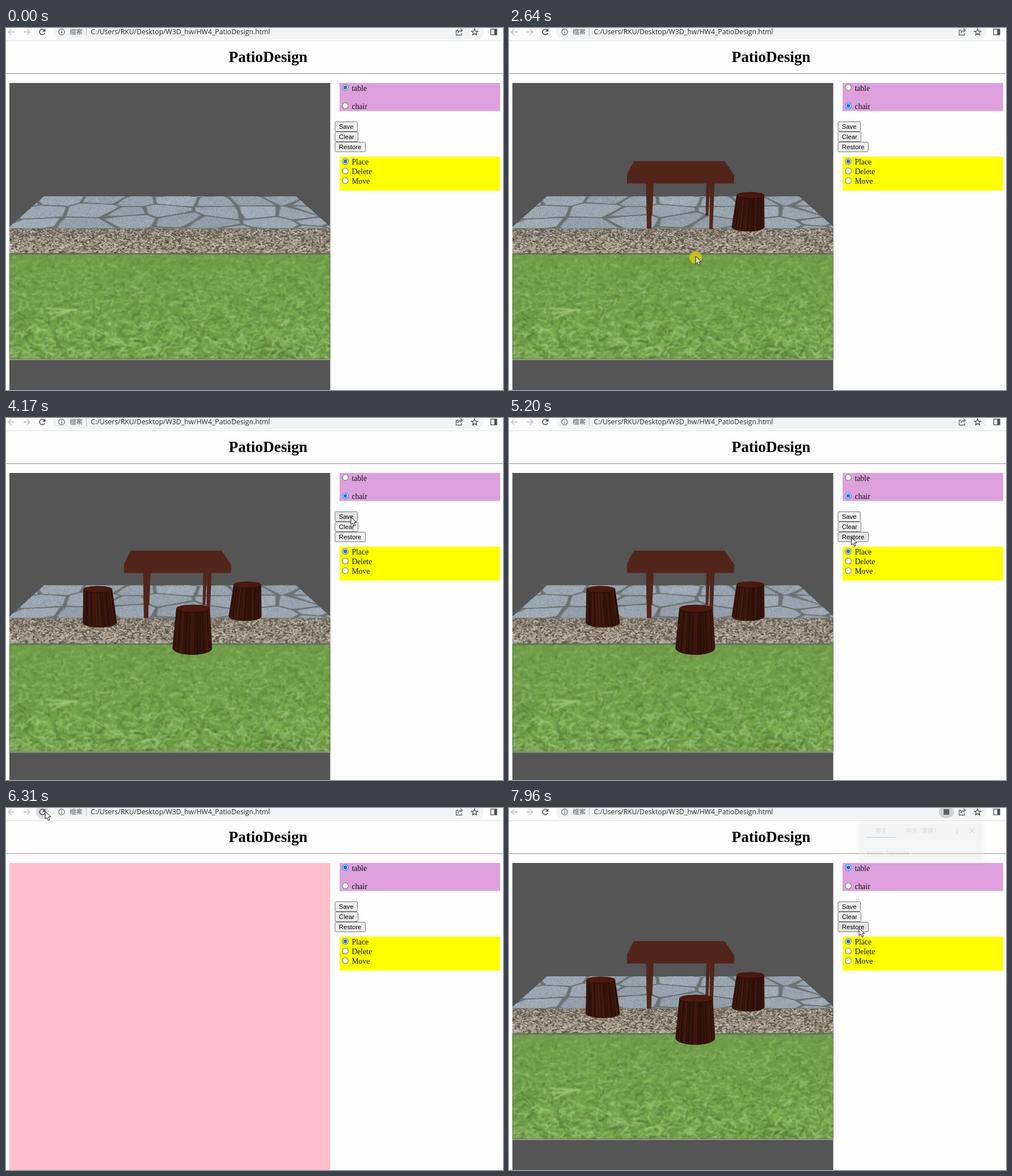
Write an HTML page with a canvas that moves like this. It is 876 by 639 pixels and loops after 8 s.

```html
<!DOCTYPE html>
<html>
<head>
<meta charset="utf-8">
<title>PatioDesign</title>
<style>
html, body { margin: 0; width: 100%; height: 100%; overflow: hidden; background: #fefefe; }
canvas { display: block; }
</style>
</head>
<body>
<canvas id="stage" width="876" height="639"></canvas>
<script>
const W = 876, H = 639, LOOP = 8000;
const ctx = document.getElementById('stage').getContext('2d');
const SERIF = '"Liberation Serif", serif';
const SANS = '"Liberation Sans", sans-serif';
const CJK = '"Noto Sans CJK TC", "Noto Sans CJK JP", "Noto Sans CJK SC", sans-serif';
const GREY = '#5f6368', DARK = '#4a4d51', WOOD = '#52251b';
const VIEW = { x: 6, y: 97, w: 565.5, h: 542 };
const FLOOR = 297, GRAVEL = 354, GRASS = 399, EDGE = 585;

function seeded(seed) {
  return () => {
    seed = (seed + 0x6D2B79F5) | 0;
    let n = Math.imul(seed ^ (seed >>> 15), 1 | seed);
    n = (n + Math.imul(n ^ (n >>> 7), 61 | n)) ^ n;
    return ((n ^ (n >>> 14)) >>> 0) / 4294967296;
  };
}

const mix = (a, b, k) => a + (b - a) * k;
const clamp = k => Math.min(1, Math.max(0, k));
const smooth = k => k * k * (3 - 2 * k);
const within = (t, a, b) => t >= a && t < b;

function layer(draw) {
  const c = document.createElement('canvas');
  c.width = W;
  c.height = H;
  draw(c.getContext('2d'));
  return c;
}

function rect(g, x, y, w, h, fill) {
  g.fillStyle = fill;
  g.fillRect(x, y, w, h);
}

function trace(g, pts) {
  g.beginPath();
  for (let i = 0; i < pts.length; i += 2) g.lineTo(pts[i], pts[i + 1]);
}

function poly(g, pts, fill) {
  trace(g, pts);
  g.fillStyle = fill;
  g.fill();
}

function line(g, pts, color, width = 1.3) {
  trace(g, pts);
  g.strokeStyle = color;
  g.lineWidth = width;
  g.stroke();
}

function oval(g, x, y, rx, ry, fill, turn = 0) {
  g.beginPath();
  g.ellipse(x, y, rx, ry, turn, 0, 7);
  g.fillStyle = fill;
  g.fill();
}

function text(g, str, x, y, font, fill = '#000', align = 'left') {
  g.font = font;
  g.fillStyle = fill;
  g.textAlign = align;
  g.fillText(str, x, y);
}

// ---- ground textures ----
// Flagstones are Voronoi cells on a jittered grid, seen in perspective.
const stones = layer(g => {
  const rnd = seeded(11), cols = 7, rows = 3, sites = [];
  for (let c = -1; c <= cols; c++) {
    for (let r = -1; r <= rows; r++) {
      sites.push({ u: c + .1 + rnd() * .8, v: r + .1 + rnd() * .8, tint: rnd() * 16 - 8 });
    }
  }
  const image = g.createImageData(W, GRAVEL - FLOOR);
  for (let y = 0; y < image.height; y++) {
    const depth = y / image.height, half = mix(222.5, 287, depth);
    for (let x = Math.max(VIEW.x, Math.ceil(288.5 - half)); x < Math.min(571, 288.5 + half); x++) {
      const u = ((x - 288.5) / half + 1) / 2 * cols, v = depth ** .85 * rows;
      let near = 9, next = 9, tint = 0;
      for (const s of sites) {
        const d = Math.hypot(s.u - u, s.v - v);
        if (d < near) { next = near; near = d; tint = s.tint; }
        else if (d < next) next = d;
      }
      const joint = 1 - clamp((next - near - .05) / .07);
      const grain = tint + (rnd() - .5) * 30;
      const i = (y * W + x) * 4;
      image.data[i] = mix(153 + grain, 106, joint);
      image.data[i + 1] = mix(165 + grain, 113, joint);
      image.data[i + 2] = mix(177 + grain, 114, joint);
      image.data[i + 3] = 255;
    }
  }
  g.putImageData(image, 0, FLOOR);
});

const gravel = layer(g => {
  const rnd = seeded(23);
  g.rect(VIEW.x, GRAVEL, VIEW.w, GRASS - GRAVEL);
  g.clip();
  rect(g, VIEW.x, GRAVEL, VIEW.w, 45, '#6d6357');
  for (let i = 0; i < 4600; i++) {
    const depth = rnd(), s = .6 + depth * .4, pebble = rnd() > .16;
    oval(g, VIEW.x + rnd() * VIEW.w, mix(GRAVEL, GRASS, depth), (1.5 + rnd() * 2.3) * s, (.8 + rnd()) * s,
      `hsl(${30 + rnd() * 10},${7 + rnd() * 10}%,${pebble ? 49 + rnd() * 27 : 27 + rnd() * 10}%)`, rnd() - .5);
  }
});

const grass = layer(g => {
  const rnd = seeded(37);
  g.rect(VIEW.x, GRASS, VIEW.w, EDGE - GRASS);
  g.clip();
  rect(g, VIEW.x, GRASS, VIEW.w, EDGE - GRASS, '#6f9c48');
  g.lineCap = 'round';
  for (let i = 0; i < 6800; i++) {
    const depth = rnd() ** 1.35, s = .6 + depth * 1.3;
    const x = VIEW.x + rnd() * VIEW.w, y = mix(GRASS, EDGE, depth);
    const turn = rnd() * Math.PI, len = (4 + rnd() * 11) * s, bend = (rnd() - .5) * 7;
    const dx = Math.cos(turn) * len, dy = Math.sin(turn) * len * .65;
    g.beginPath();
    g.moveTo(x, y);
    g.quadraticCurveTo(x + dx / 2 + bend, y + dy / 2 - bend, x + dx, y + dy);
    g.strokeStyle = `hsla(${87 + rnd() * 9},${36 + rnd() * 10}%,${29 + rnd() * 40}%,.68)`;
    g.lineWidth = s * (.7 + rnd() * .9);
    g.stroke();
  }
  for (let i = 0; i < 3; i++) line(g, [72 + i * 4, 495 + i * 9, 124 - i * 6, 498], 'rgba(165,203,118,.8)', 3);
});

const ground = layer(g => {
  g.filter = 'blur(.5px)';
  g.drawImage(stones, 0, 0);
  g.drawImage(gravel, 0, 0);
  g.filter = 'blur(.9px)';
  g.drawImage(grass, 0, 0);
  g.filter = 'none';
  rect(g, VIEW.x, 353, VIEW.w, 1.2, '#85807b');
  rect(g, VIEW.x, 397.6, VIEW.w, 1.6, '#62615a');
  rect(g, VIEW.x, 583.6, VIEW.w, 1, '#6e7a62');
  rect(g, VIEW.x, 584.6, VIEW.w, 1.4, '#a2a5a2');
});

// ---- furniture ----
function drawTable(g) {
  const leg = (x, lean, w, foot) =>
    poly(g, [x, 270, x + w, 270, x + w * .75 + lean, foot, x + lean, foot], WOOD);
  leg(249, -1, 6, 331);
  leg(348, -1.5, 6.5, 331);
  leg(241.5, 1.5, 10.5, 354);
  leg(354.5, -1.5, 8, 355);
  poly(g, [220, 235, 380, 235, 397, 260, 396.5, 274.5, 208, 274.5, 208, 258], WOOD);
}

// A log stool whose size and lean follow from where it stands.
function drawChair(g, x, y) {
  const rnd = seeded(x), near = y - 351;
  const rx = 29 + near * .11, ry = 8 + near * .07;
  const tx = x + (x - 288) * .03, ty = y - 56 - near * .255;
  const topRx = rx * .84, topRy = 5.5 + near * .02;
  const body = new Path2D();
  body.ellipse(tx, ty, topRx, topRy, 0, Math.PI, 0);
  body.ellipse(x, y, rx, ry, 0, 0, Math.PI);
  body.closePath();
  g.save();
  g.clip(body);
  rect(g, x - 50, ty - 20, 100, 130, '#42170d');
  for (let u = -.98; u < 1; u += .055) {
    const drop = Math.sqrt(1 - u * u);
    line(g, [tx + topRx * u, ty + topRy * drop, x + rx * u, y + ry * drop + 1],
      `hsl(${10 + rnd() * 6},64%,${10 + rnd() * 9 - Math.abs(u) * 3}%)`, 1.2 + rnd() * 1.4);
  }
  oval(g, tx, ty + 1, topRx, topRy, '#260c07');
  oval(g, tx, ty, topRx, topRy, '#4a190f');
  g.restore();
}

const table = layer(drawTable);
const rightChair = layer(g => drawChair(g, 421.5, 351));
const leftChair = layer(g => drawChair(g, 165.5, 362));
const frontChair = layer(g => drawChair(g, 328.5, 406));

// ---- browser chrome and static page ----
function arrow(g, x, dir) {
  line(g, [x - 5.5 * dir, 7, x + 5.5 * dir, 7], '#b9bbbe', 1.4);
  line(g, [x + .5 * dir, 2, x + 5.5 * dir, 7, x + .5 * dir, 12], '#b9bbbe', 1.4);
}

const page = layer(g => {
  rect(g, 0, 0, W, H, '#fefefe');
  g.beginPath();
  g.roundRect(83, -8, 759, 27, 13);
  g.fillStyle = '#f1f3f4';
  g.fill();
  rect(g, 0, 22, W, 1, '#dddfe1');
  arrow(g, 9.5, -1);
  arrow(g, 36.5, 1);

  oval(g, 98, 7, 5.8, 5.8, GREY);
  oval(g, 98, 7, 4.6, 4.6, '#f1f3f4');
  rect(g, 97.4, 6.3, 1.3, 3.8, GREY);
  rect(g, 97.4, 3.8, 1.3, 1.3, GREY);
  text(g, '檔案', 112, 11, '11.5px ' + CJK, GREY);
  rect(g, 141, 0, 1, 14, '#b5b8bc');
  text(g, 'C:/Users/RKU/Desktop/W3D_hw/HW4_PatioDesign.html', 149.5, 11, '12.2px "Open Sans", sans-serif', '#26282b');

  line(g, [797, 4, 793.5, 4, 793.5, 12.5, 803, 12.5, 803, 9], GREY);
  line(g, [796.5, 9, 798, 5.5, 804, 4], GREY);
  line(g, [801, 1, 804.5, 4, 801, 7], GREY);
  g.beginPath();
  for (let i = 0; i < 10; i++) {
    const a = i * Math.PI / 5 - Math.PI / 2, r = i % 2 ? 2.6 : 6;
    g.lineTo(826 + Math.cos(a) * r, 7.5 + Math.sin(a) * r);
  }
  g.closePath();
  g.strokeStyle = DARK;
  g.stroke();
  g.strokeRect(854.5, 2, 10.5, 10);
  rect(g, 860.5, 2, 4.5, 10, DARK);

  text(g, 'PatioDesign', 462, 60, 'bold 27.2px ' + SERIF, '#000', 'center');
  rect(g, 0, 80, W, 1, '#939393');
  rect(g, 588, 97, 283, 49.5, '#dda0dd');
  rect(g, 588, 227, 283, 60, '#ffff00');
  const label = (str, y) => text(g, str, 609.5, y, '13.6px ' + SERIF, '#111');
  label('table', 111);
  label('chair', 143);
  ['Place', 'Delete', 'Move'].forEach((str, i) => label(str, 241 + i * 17));
});

function radio(y, on, blue) {
  oval(ctx, 598, y, 5.7, 5.7, on ? blue : '#767676');
  oval(ctx, 598, y, 4.7, 4.7, '#fff');
  if (on) oval(ctx, 598, y, 3.4, 3.4, blue);
}

function button(label, y, w, pointer) {
  const hovered = within(pointer.x, 580, 580 + w) && within(pointer.y, y, y + 18);
  ctx.beginPath();
  ctx.roundRect(580, y + .5, w - .5, 17, 2);
  ctx.fillStyle = hovered ? '#e4e4e4' : '#efefef';
  ctx.fill();
  ctx.strokeStyle = '#767676';
  ctx.lineWidth = 1;
  ctx.stroke();
  text(ctx, label, 586.7, y + 13, '11.33px ' + SANS);
}

function reloadIcon(pointer) {
  if (Math.hypot(pointer.x - 64, pointer.y - 7) < 13) oval(ctx, 64, 7, 12, 12, '#dcdee1');
  ctx.beginPath();
  ctx.arc(64, 7, 4.8, .4, 5.5);
  ctx.strokeStyle = DARK;
  ctx.lineWidth = 1.6;
  ctx.stroke();
  poly(ctx, [69.5, 1, 69.5, 6.5, 64, 6.5], DARK);
}

function popup(alpha) {
  if (alpha <= 0) return;
  ctx.save();
  ctx.globalAlpha = alpha;
  ctx.shadowColor = 'rgba(0,0,0,.3)';
  ctx.shadowBlur = 6;
  ctx.shadowOffsetY = 1;
  rect(ctx, 616, 23, 220, 75, '#fff');
  ctx.shadowColor = 'transparent';
  rect(ctx, 616, 60, 220, 38, '#f8f9fa');
  text(ctx, '英文', 656, 44, '10px ' + CJK, '#1a73e8', 'center');
  rect(ctx, 630, 51, 52, 2, '#1a73e8');
  text(ctx, '中文 ( 繁體 )', 727, 44, '10px ' + CJK, GREY, 'center');
  for (let y = 36; y <= 44; y += 4) oval(ctx, 790, y, 1.2, 1.2, GREY);
  line(ctx, [812, 36, 820, 44], GREY);
  line(ctx, [820, 36, 812, 44], GREY);
  text(ctx, 'Velomi Translate', 630, 83, '10px Roboto, sans-serif', GREY);
  ctx.restore();
}

// ---- the user's session: each visit ends in a click ----
const ENTER = 70, LINGER = 160, PRESS = 100, RESPONSE = 80;
const visits = [];
function visit(x, y, arrive, click, { via, leave } = {}) {
  const from = visits[visits.length - 1] || { x: 845, y: 613, click: ENTER - LINGER };
  const bend = via || { x: (from.x + x) / 2, y: (from.y + y) / 2 };
  visits.push({ x, y, arrive, click, from, bend, leave: leave || from.click + LINGER });
  return click + RESPONSE;
}

const tableAt = visit(302, 341, 610, 750, { via: { x: 590, y: 10 } });
const chairMode = visit(597, 131, 1340, 1470, { via: { x: 760, y: 150 } });
const rightAt = visit(423, 349, 2180, 2220);
const frontAt = visit(329, 403, 2590, 2600);
const leftAt = visit(166, 361, 2980, 3020);
visit(608, 175, 3960, 4240, { via: { x: 700, y: 200 } });
const clearAt = visit(605, 193, 4480, 4510);
const restoreAt = visit(604, 211, 4800, 5030);
const reloadAt = visit(69, 6, 5760, 5840);
const restoreAgainAt = visit(617, 212, 7400, 7690, { leave: 6580 });
const LOADED = 6510;

function pointerAt(t) {
  const v = visits.findLast(step => t >= step.leave);
  if (!v) return { x: -99, y: -99 };
  const k = smooth(clamp((t - v.leave) / (v.arrive - v.leave)));
  const along = axis => mix(mix(v.from[axis], v.bend[axis], k), mix(v.bend[axis], v[axis], k), k);
  return { x: along('x'), y: along('y') };
}

function drawPointer(t, { x, y }) {
  if (visits.some(v => within(t, v.click, v.click + PRESS))) {
    oval(ctx, x, y + 2, 11, 11, 'rgba(208,200,20,.88)');
  }
  ctx.save();
  ctx.translate(x, y);
  ctx.lineJoin = 'round';
  trace(ctx, [0, 0, 0, 13.5, 3.2, 10.7, 5.4, 15.8, 7.8, 14.8, 5.6, 9.8, 9.7, 9.6]);
  ctx.closePath();
  ctx.fillStyle = '#fff';
  ctx.fill();
  ctx.strokeStyle = '#111';
  ctx.lineWidth = 1;
  ctx.stroke();
  ctx.restore();
}

function drawScene(t) {
  const loading = within(t, reloadAt, LOADED);
  rect(ctx, VIEW.x, VIEW.y, VIEW.w, VIEW.h, loading ? '#ffc0cb' : '#555555');
  if (loading) return;

  // After the front chair the ground is drawn slightly taller.
  const taller = within(t, frontAt, reloadAt);
  const stretch = taller ? 1.022 : 1, lift = taller ? -1 : 0;
  ctx.save();
  ctx.translate(0, 380 * (1 - stretch));
  ctx.scale(1, stretch);
  ctx.drawImage(ground, 0, 0);
  ctx.restore();

  const restored = within(t, restoreAt, reloadAt) || t >= restoreAgainAt;
  const place = (item, from, dy) => {
    if (restored || within(t, from, clearAt)) ctx.drawImage(item, 0, dy);
  };
  place(table, tableAt, lift);
  place(rightChair, rightAt, lift);
  place(leftChair, leftAt, lift);
  place(frontChair, frontAt, 0);
}

function render(t) {
  const pointer = pointerAt(t);
  const chairs = within(t, chairMode, reloadAt);
  ctx.drawImage(page, 0, 0);
  reloadIcon(pointer);
  drawScene(t);
  radio(105, !chairs, t < chairMode ? '#3f74ab' : '#0b6fd8');
  radio(137.5, chairs, '#1a7cec');
  for (let i = 0; i < 3; i++) radio(235.5 + i * 17, i === 0, '#41739f');
  button('Save', 165, 40, pointer);
  button('Clear', 183, 41, pointer);
  button('Restore', 201, 54, pointer);
  if (t >= LOADED + 210) {
    oval(ctx, 771, 7, 13.5, 11, '#cfd1d5');
    rect(ctx, 766, 2, 10, 10, GREY);
  }
  popup(Math.min((t - LOADED - 340) / 140, 1 - (t - restoreAgainAt) / 230, 1));
  drawPointer(t, pointer);
}

function tick() {
  render(performance.now() % LOOP);
  requestAnimationFrame(tick);
}
tick();
</script>
</body>
</html>
```
